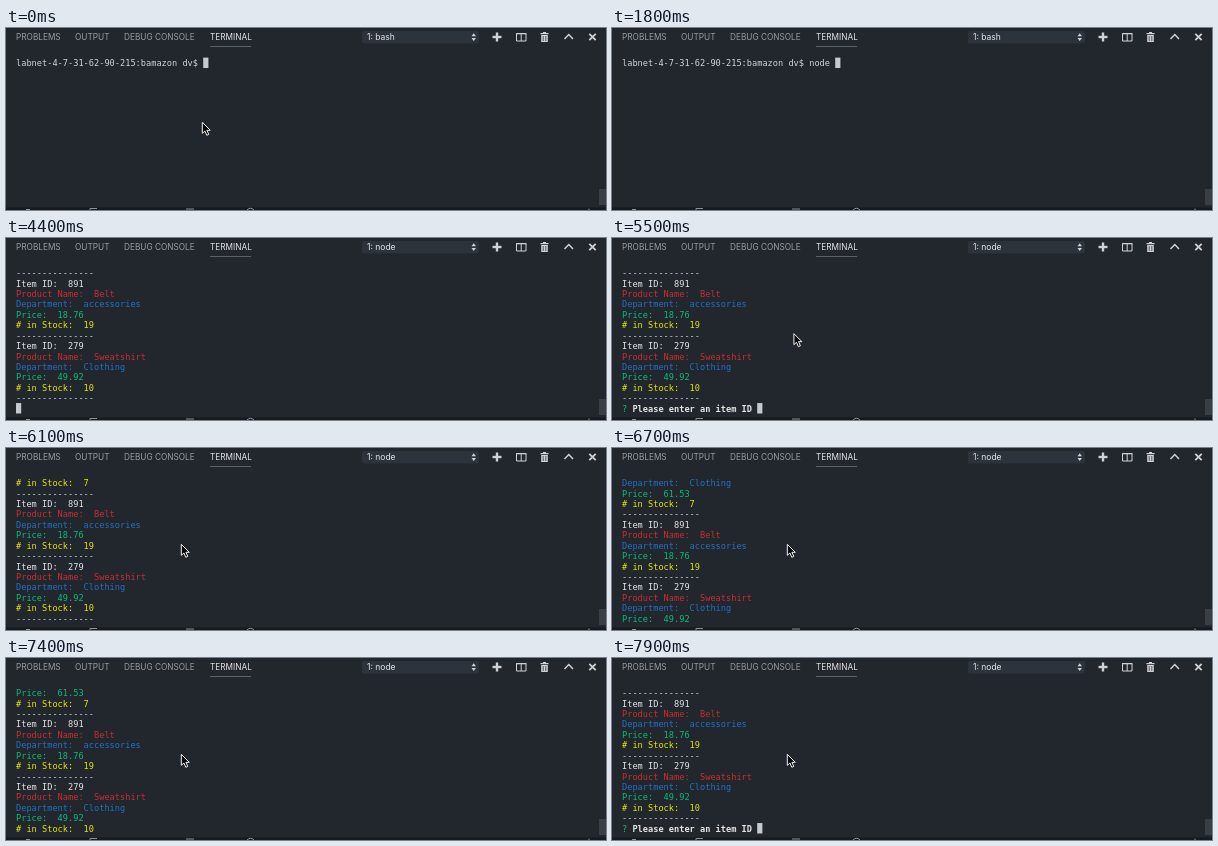
Write an HTML page with a canvas that moves like this. It is 600 px wide and 182 px high and loops after 8 s.

```html
<!DOCTYPE html>
<html lang="en">
<head>
<meta charset="utf-8">
<title>Terminal session</title>
<style>
  html, body { margin: 0; width: 100%; height: 100%; overflow: hidden; background: #22262d; }
  canvas { display: block; width: 600px; height: 182px; }
</style>
</head>
<body>
<canvas id="stage"></canvas>
<script>
const LOOP = 8000, LEFT = 10, TOP = 29.6, COL = 5.2, ROW = 10.42, ROWS = 14;
const COLOR = {
  text: '#d2d4d8', white: '#e5e5e5', red: '#c92f30', blue: '#2470c4',
  green: '#0dbc79', yellow: '#e5e510', icon: '#cfd1d4', bg: '#22262d'
};
const canvas = document.getElementById('stage');
const ctx = canvas.getContext('2d');
const ratio = window.devicePixelRatio || 1;
canvas.width = 600 * ratio;
canvas.height = 182 * ratio;
ctx.scale(ratio, ratio);

const prompt = 'labnet-4-7-31-62-90-215:bamazon dv$ ';
const question = '? Please enter an item ID ';
const rule = ['-'.repeat(15), COLOR.text];
const item = (id, name, department, price, stock) => [
  rule,
  ['Item ID:  ' + id, COLOR.white],
  ['Product Name:  ' + name, COLOR.red],
  ['Department:  ' + department, COLOR.blue],
  ['Price:  ' + price, COLOR.green],
  ['# in Stock:  ' + stock, COLOR.yellow]
];
const lines = [
  ...item(519, 'Jacket', 'Clothing', '61.53', 7),
  ...item(891, 'Belt', 'accessories', '18.76', 19),
  ...item(279, 'Sweatshirt', 'Clothing', '49.92', 10),
  rule
];

// [start time, value]
const typing = [[0, ''], [600, 'n'], [900, 'no'], [1000, 'nod'], [1100, 'node'], [1800, 'node '],
  [2500, 'node b'], [2700, 'node ba'], [2900, 'node bamazonCustomer.js ']];
const scrolling = [[0, 0], [5900, 1], [6300, 2], [6600, 3], [6800, 4], [6900, 5], [7000, 6],
  [7300, 4], [7400, 2], [7500, 1], [7600, 0]];
const at = (steps, t) => steps.filter(step => step[0] <= t).pop()[1];

function rect(x, y, w, h, color) {
  ctx.fillStyle = color;
  ctx.fillRect(x, y, w, h);
}

function stroke(path, color = COLOR.icon, width = 1) {
  ctx.strokeStyle = color;
  ctx.lineWidth = width;
  ctx.stroke(new Path2D(path));
}

function fill(path, color = COLOR.icon) {
  ctx.fillStyle = color;
  ctx.fill(new Path2D(path));
}

function label(text, x, y, color, size = 8.25) {
  ctx.font = size + 'px Inter, sans-serif';
  ctx.fillStyle = color;
  ctx.fillText(text, x, y);
}

function mono(text, row, color, col = 0, weight = '') {
  ctx.font = weight + ' 8.64px "DejaVu Sans Mono", monospace';
  ctx.fillStyle = color;
  [...text].forEach((c, i) => ctx.fillText(c, LEFT + (col + i) * COL, TOP + 8.6 + row * ROW));
}

function block(col, row) {
  rect(LEFT + col * COL, TOP + row * ROW, COL, ROW, '#c6c9ce');
}

function drawHeader(process) {
  label('PROBLEMS', 10, 12, '#9a9da3');
  label('OUTPUT', 69, 12, '#9a9da3');
  label('DEBUG CONSOLE', 118, 12, '#9a9da3');
  label('TERMINAL', 204, 12, '#e4e5e7');
  rect(204, 18, 41, 0.7, '#777b82');

  ctx.fillStyle = '#2d333d';
  ctx.beginPath();
  ctx.roundRect(356, 3, 117, 12.5, 2);
  ctx.fill();
  label('1: ' + process, 361, 12.2, '#e4e5e7', 8.5);
  fill('M465.5 8.2 L467.7 5.2 L470 8.2Z M465.5 10 L467.7 13 L470 10Z');

  rect(486.5, 7.8, 9, 2.4, COLOR.icon);
  rect(489.8, 4.5, 2.4, 9, COLOR.icon);
  stroke('M510.5 5.5 H520 V13 H510.5Z M515.2 5 V13 M510 5.8 H520.5');
  fill('M534.5 5 H537 V4 H540 V5 H542.5 V6.3 H534.5Z M535.2 7 H541.8 V14 H535.2Z');
  stroke('M537.2 8 V13 M539.8 8 V13', COLOR.bg, 0.7);
  stroke('M558.5 11 L562.8 6.5 L567 11', COLOR.icon, 1.5);
  stroke('M583.3 5.8 L589.7 12.2 M589.7 5.8 L583.3 12.2', COLOR.icon, 1.8);
}

function drawEdges() {
  rect(593, 161, 7, 16, '#393e47');
  rect(0, 179.5, 600, 2.5, '#171a1f');
  stroke('M84 182 V180.5 H91 M180 181 H188 M20 181.5 H24 M583 180.5 V182', '#8d9198');
  stroke('M241 182 Q244.5 178.5 248 182', '#8d9198');
}

function drawTerminal(t) {
  if (t < 4400) {
    const typed = prompt + at(typing, t);
    mono(typed, 0, COLOR.text);
    t < 4100 ? block(typed.length, 0) : block(0, 1);
    return;
  }
  const first = 6 - at(scrolling, t);
  lines.slice(first, first + ROWS).forEach(([text, color], row) => mono(text, row, color));
  const last = lines.length - first;
  if (last >= ROWS) return;
  if (t < 4500) return block(0, last);
  mono('?', last, COLOR.green);
  mono(question.slice(2), last, COLOR.white, 2, 'bold');
  block(question.length, last);
}

function drawPointer(t) {
  if (t >= 600 && t < 5000) return;
  const p = t < 600 ? 0 : Math.min(1, (t - 5000) / 800);
  const ease = p * p * (3 - 2 * p);
  const arrow = 'M0 0 V11 L2.6 8.7 L4.5 13 L6.5 12.1 L4.6 8 H8Z';
  ctx.save();
  ctx.translate(196.3 - 21 * ease, 94.3 + 2 * ease);
  fill(arrow, '#08090a');
  stroke(arrow, '#f2f2f2', 1);
  ctx.restore();
}

function draw(now) {
  const t = now % LOOP;
  rect(0, 0, 600, 182, COLOR.bg);
  drawHeader(t < 4300 ? 'bash' : 'node');
  drawTerminal(t);
  drawEdges();
  drawPointer(t);
  requestAnimationFrame(draw);
}
requestAnimationFrame(draw);
</script>
</body>
</html>
```
